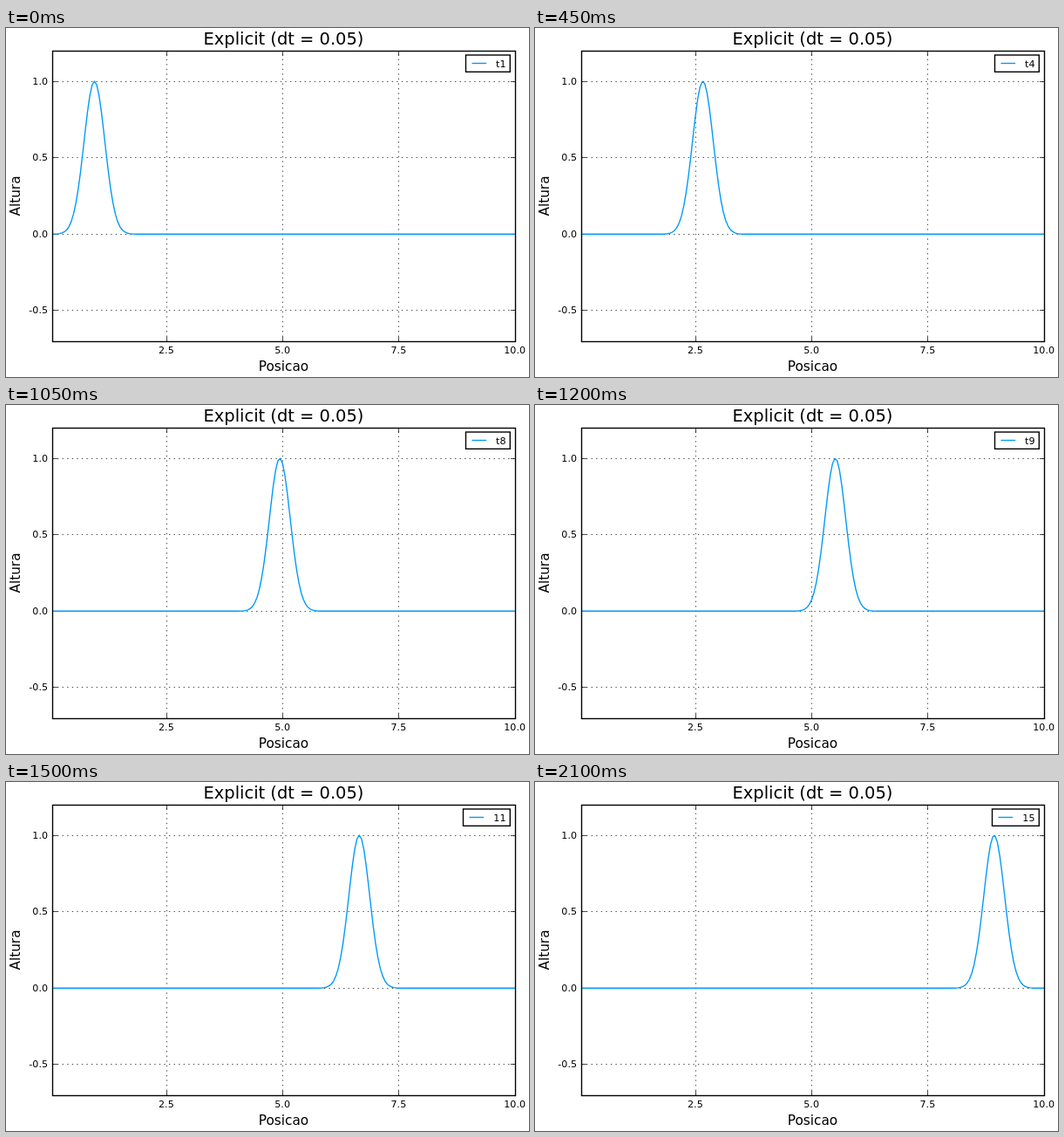
An HTML page for the animation above (2.25 s loop, 600 px wide and 400 px high).

```html
<!DOCTYPE html>
<html lang="pt">
<head>
<meta charset="utf-8">
<title>Explicit</title>
<style>
html, body { margin: 0; width: 100%; height: 100%; overflow: hidden; background: #fff; }
svg { display: block; width: 600px; height: 400px; }
text { font: 11.11px "DejaVu Sans", sans-serif; fill: #000; }
.title { font-size: 19.44px; }
.label { font-size: 15.28px; }
.mid { text-anchor: middle; }
.end { text-anchor: end; }
.grid { stroke: #000; stroke-width: .7; stroke-dasharray: 1.39 4.17; }
.tick { stroke: #000; stroke-width: .7; }
.frame { fill: none; stroke: #000; stroke-width: 1.39; }
.wave { fill: none; stroke: #009afa; stroke-width: 1.39; stroke-linejoin: round; }
</style>
</head>
<body>
<svg viewBox="0 0 600 400">
  <g id="axes"></g>
  <path id="curve" class="wave"/>
  <rect class="frame" x="53.5" y="26.5" width="531" height="333"/>
  <text class="title mid" x="318.5" y="19">Explicit (dt = 0.05)</text>
  <text class="label mid" x="318.5" y="393">Posicao</text>
  <text class="label mid" transform="translate(16 192.5) rotate(-90)">Altura</text>
  <rect id="box" class="frame" y="31" height="19.3" style="fill:#fff"/>
  <path id="key" class="wave"/>
  <text id="name" class="end" x="573.5" y="45"></text>
</svg>
<script>
const STEP = 150, STEPS = 15;
const LEFT = 53.5, RIGHT = 584.5, TOP = 26.5, BOTTOM = 359.5, TICK = 5.6;
const START = 0.95, SHIFT = 0.57, DX = 0.05;
const $ = id => document.getElementById(id);
const px = x => LEFT + (x - DX) * 53.3;
const py = y => 236.3 - y * 175.3;
const snap = v => Math.floor(v) + 0.5;

function add(tag, attrs, text = "") {
  const el = document.createElementNS("http://www.w3.org/2000/svg", tag);
  for (const k in attrs) el.setAttribute(k, attrs[k]);
  el.textContent = text;
  $("axes").append(el);
}

function drawAxes() {
  for (const v of [2.5, 5, 7.5, 10]) {
    const x = snap(px(v));
    if (v < 10) {
      add("path", { class: "grid", d: `M${x} ${BOTTOM}V${TOP}` });
      add("path", { class: "tick", d: `M${x} ${BOTTOM}v${-TICK}M${x} ${TOP}v${TICK}` });
    }
    add("text", { class: "mid", x: px(v) - 0.2, y: 373 }, v.toFixed(1));
  }
  for (const v of [-0.5, 0, 0.5, 1]) {
    const y = snap(py(v));
    add("path", { class: "grid", d: `M${LEFT} ${y}H${RIGHT}` });
    add("path", { class: "tick", d: `M${LEFT} ${y}h${TICK}M${RIGHT} ${y}h${-TICK}` });
    add("text", { class: "end", x: 48, y: y + 3.5 }, v.toFixed(1));
  }
}

function draw(step) {
  const center = START + SHIFT * step;
  const points = Array.from({ length: 200 }, (_, i) => {
    const x = (i + 1) * DX;
    return px(x).toFixed(2) + " " + py(Math.exp(-10 * (x - center) ** 2)).toFixed(2);
  });
  $("curve").setAttribute("d", "M" + points.join("L"));

  // Two-digit labels drop the prefix and widen the legend
  const wide = step >= 9;
  const x = wide ? 524.5 : 527.5;
  $("box").setAttribute("x", x);
  $("box").setAttribute("width", 578.3 - x);
  $("key").setAttribute("d", `M${x + 7} 40.5h16.7`);
  $("name").textContent = (wide ? "" : "t") + (step + 1);
}

let shown = -1;
const t0 = performance.now();
function tick() {
  const step = Math.floor((performance.now() - t0) / STEP) % STEPS;
  if (step !== shown) draw(shown = step);
  requestAnimationFrame(tick);
}
drawAxes();
tick();
</script>
</body>
</html>
```
